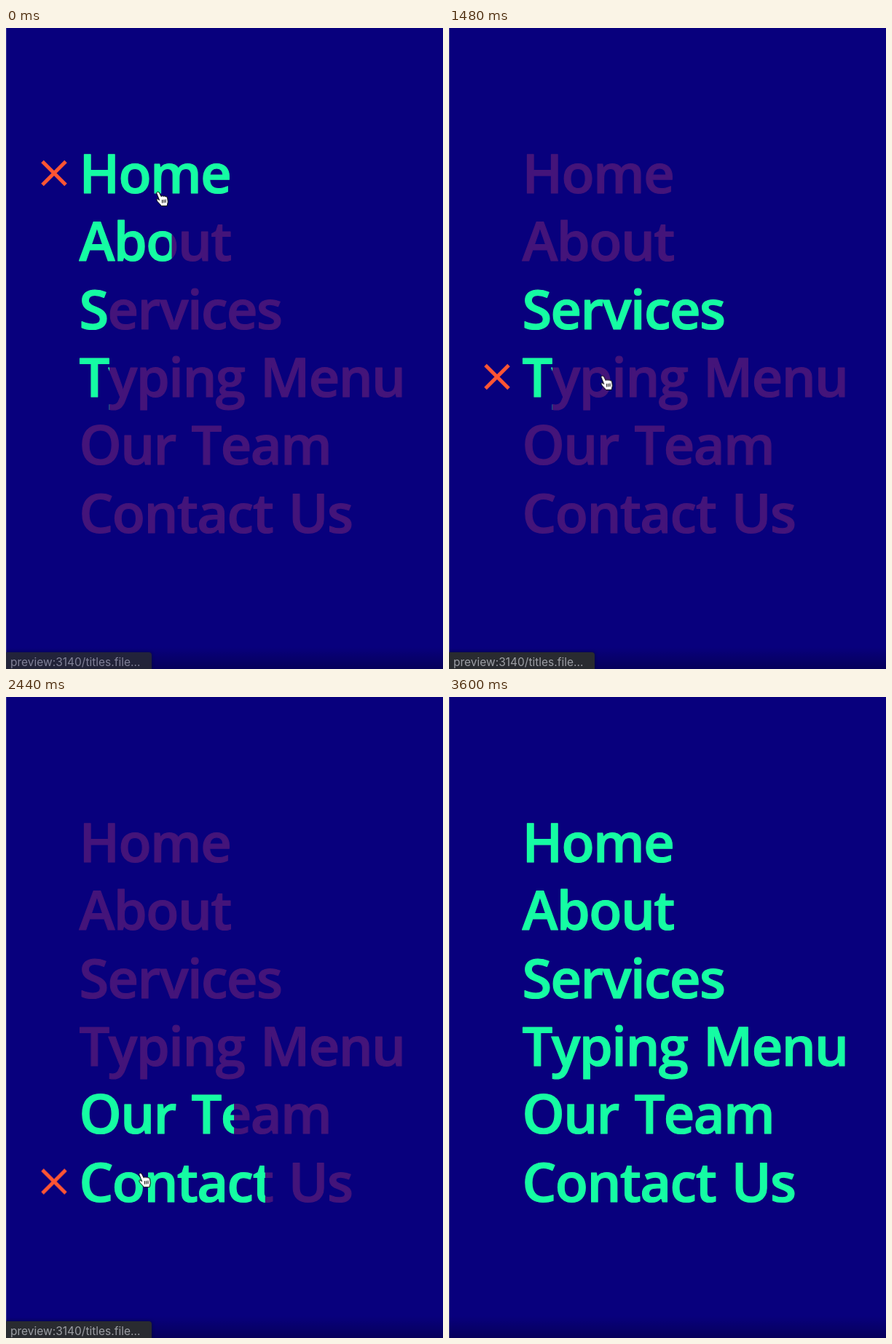
These frames come from a looping animation (600x881 px, 3640 ms). An HTML page:

```html
<!DOCTYPE html>
<html lang="en">
<head>
<meta charset="utf-8">
<title>Typing menu</title>
<style>
  html, body { margin: 0; height: 100%; overflow: hidden; background: #08007d; }
  svg { display: block; width: 100vw; height: 100vh; }

  .menu {
    font: 600 74px "Open Sans", "Noto Sans", sans-serif;
    font-kerning: none;
    letter-spacing: -1.6px;
    word-spacing: 4px;
    stroke-width: 1.2;
    stroke-linejoin: round;
  }
  .dim { fill: #44147a; stroke: #44147a; }
  .lit { fill: #15fca3; stroke: #15fca3; }

  /* Each fill types and erases in 11 steps of equal width. */
  clipPath rect {
    transform-origin: 99.3px 0;
    animation: 3640ms steps(11) infinite;
  }
  #c0 rect { animation-name: home; }
  #c1 rect { animation-name: about; }
  #c2 rect { animation-name: services; }
  #c3 rect { animation-name: typing; }
  #c4 rect { animation-name: team; }
  #c5 rect { animation-name: contact; }

  @keyframes home {
    0%, 10.577% { transform: scaleX(1); }
    18.819%, 76.209% { transform: scaleX(0); }
    84.451%, 100% { transform: scaleX(1); }
  }
  @keyframes about {
    0% { transform: scaleX(.27273); animation-timing-function: steps(3); }
    1.87%, 10.577% { transform: scaleX(0); }
    18.819%, 23.297% { transform: scaleX(1); }
    31.538%, 76.209% { transform: scaleX(0); }
    84.451%, 100% { transform: scaleX(1); }
  }
  @keyframes services {
    0% { transform: scaleX(.09091); animation-timing-function: step-end; }
    .4%, 23.297% { transform: scaleX(0); }
    31.538%, 39.78% { transform: scaleX(1); }
    48.022%, 76.209% { transform: scaleX(0); }
    84.451%, 100% { transform: scaleX(1); }
  }
  @keyframes typing {
    0% { transform: scaleX(.09091); animation-timing-function: step-end; }
    .4%, 39.78% { transform: scaleX(0); }
    48.022%, 48.681% { transform: scaleX(1); }
    56.923%, 76.209% { transform: scaleX(0); }
    84.451%, 100% { transform: scaleX(1); }
  }
  @keyframes team {
    0%, 48.681% { transform: scaleX(0); }
    56.923%, 62.143% { transform: scaleX(1); }
    70.385%, 76.209% { transform: scaleX(0); }
    84.451%, 100% { transform: scaleX(1); }
  }
  @keyframes contact {
    0%, 62.143% { transform: scaleX(0); }
    70.385%, 100% { transform: scaleX(1); }
  }

  .mark {
    fill: none; stroke: #ff5533; stroke-width: 5;
    animation: mark 3640ms step-end infinite;
  }
  @keyframes mark {
    0% { transform: translateY(0); opacity: 1; }
    10.577% { transform: translateY(93.3px); }
    23.297% { transform: translateY(186.6px); }
    39.78% { transform: translateY(279.9px); }
    48.681% { transform: translateY(373.2px); }
    62.143% { transform: translateY(466.5px); opacity: 1; }
    76.209%, 100% { transform: translateY(466.5px); opacity: 0; }
  }

  .hand { stroke: #000; stroke-linejoin: round; animation: hand 3640ms linear infinite; }
  @keyframes hand {
    0% { transform: translate(206px, 225px); }
    4.4% { transform: translate(209px, 233px); }
    10.577% { transform: translate(225px, 279px); }
    13.187% { transform: translate(229px, 300px); }
    16.484% { transform: translate(230px, 310px); }
    23.297% { transform: translate(221px, 371px); }
    29.67% { transform: translate(213px, 387px); }
    35.714% { transform: translate(211px, 405px); }
    39.78% { transform: translate(209px, 465px); }
    46.154% { transform: translate(203px, 555px); }
    48.681% { transform: translate(201px, 562px); }
    50.549% { transform: translate(200px, 585px); }
    56.5% { transform: translate(194px, 605px); }
    62.143% { transform: translate(185px, 645px); }
    67.033% { transform: translate(182px, 654px); }
    74.176% { transform: translate(183px, 690px); }
    76.209% { transform: translate(185px, 745px); }
    81.319%, 100% { transform: translate(189px, 900px); }
  }

  .status { animation: status 3640ms linear infinite; }
  .status path { fill: #292b30; filter: drop-shadow(0 0 2px rgba(0, 0, 0, .5)); }
  .status text { font: 15.5px Inter, Roboto, sans-serif; fill: #9c9ea4; }
  @keyframes status {
    0% { opacity: .82; }
    2.2%, 85.7% { opacity: 1; }
    90.66%, 100% { opacity: 0; }
  }
</style>
</head>
<body>
<svg viewBox="0 0 600 881" preserveAspectRatio="none">
  <defs>
    <linearGradient id="shade" x2="0" y2="1">
      <stop stop-color="#000" stop-opacity="0"/>
      <stop offset="1" stop-color="#000" stop-opacity=".28"/>
    </linearGradient>
  </defs>
  <rect width="600" height="881" fill="#08007d"/>
  <rect y="851" width="600" height="30" fill="url(#shade)"/>
  <rect width="1" height="881" fill="#fff" opacity=".2"/>

  <g class="menu" id="menu"></g>

  <path class="mark" d="M50 183.5l32 32m0-32l-32 32"/>

  <g class="status">
    <path d="M0 858H196q4 0 4 4V881H0Z"/>
    <text x="6" y="876.5">preview:3140/titles.file...</text>
  </g>

  <g class="hand">
    <path fill="#fff" d="M.5 1.5Q2.2-.9 4.3 1L7 6.5Q9 4.8 10.2 6.3Q12 5.2 13 6.7Q15.5 6 15.7 9L16.3 14L15 19.5H7.5L2 13.5Q-.2 10.5 1.8 9.6L4.5 11.5Z"/>
    <path fill="none" d="M8.5 11v4.5m2.3-4.7v4.5M13 10.5V15"/>
  </g>
</svg>
<script>
  const items = ['Home', 'About', 'Services', 'Typing Menu', 'Our Team', 'Contact Us'];
  const line = (label, i) => {
    const y = 227 + i * 93.3;
    const text = attrs => `<text x="100.5" y="${y}" ${attrs}>${label}</text>`;
    return `<clipPath id="c${i}"><rect x="99.3" y="${y - 70}" width="470.25" height="93"/></clipPath>`
      + text('class="dim"') + text(`class="lit" clip-path="url(#c${i})"`);
  };
  document.getElementById('menu').innerHTML = items.map(line).join('');
</script>
</body>
</html>
```
